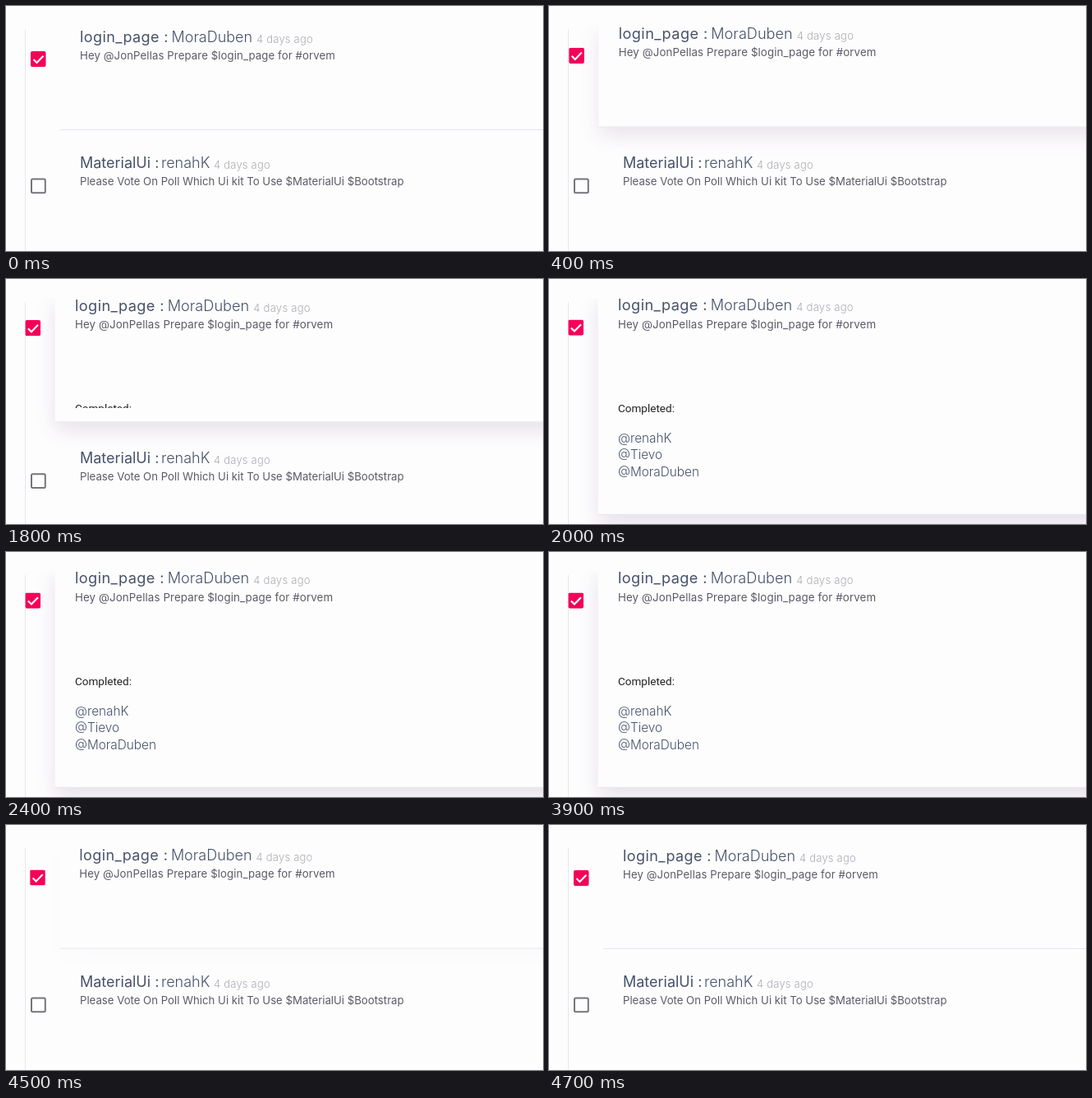
An HTML page that plays this animation: 654x298 px, repeating every 6300 ms.

```html
<!DOCTYPE html>
<html lang="en">
<head>
<meta charset="utf-8">
<title>Task list</title>
<style>
  html, body { margin: 0; width: 100%; height: 100%; overflow: hidden; background: #fefdfe; }
  #stage { position: relative; width: 654px; height: 298px; overflow: hidden; font-family: Inter, "Open Sans", sans-serif; }
  #stage div, #stage span, #stage svg { position: absolute; }
  #rail { left: 23px; top: 28px; width: 1px; height: 270px; background: #e6e5eb; }
  #view { left: 0; top: 23px; width: 654px; height: 275px; overflow: hidden; }
  #list { left: 0; top: -23px; }
  .item { left: 0; top: 0; width: 760px; }
  #first { z-index: 1; }
  #card { left: 66px; top: 24px; width: 680px; box-sizing: border-box; background: #fefdfe; border-bottom: 1px solid #e7e5ec; }
  #more { left: 66px; top: 134.5px; width: 500px; overflow: hidden; }
  span { line-height: 20px; white-space: pre; }
  .title { font-size: 18px; color: #46526a; }
  .name { font-size: 18px; font-weight: 300; color: #46526a; }
  .time { font-size: 13px; font-weight: 300; letter-spacing: .2px; color: #adadb5; }
  .body { font-size: 13.2px; color: #5a5a66; }
  .head { font: 13.4px/20px Roboto, sans-serif; color: #222; }
  .who { font-size: 15.2px; font-weight: 300; color: #46526a; }
</style>
</head>
<body>
<div id="stage">
  <div id="rail"></div>
  <div id="view"><div id="list">
    <div class="item" id="first">
      <div id="card"></div>
      <svg style="left:30px;top:55px" width="19" height="19">
        <rect width="18.500" height="19" rx="2" fill="#f50057"/>
        <path d="M3.500 10l4 4 8-8.300" fill="none" stroke="#fff" stroke-width="2.100"/>
      </svg>
      <span class="title" style="left:90px;top:28px;letter-spacing:.4px">login_page :</span>
      <span class="name" style="left:201.5px;top:28px">MoraDuben</span>
      <span class="time" style="left:305px;top:29.5px">4 days ago</span>
      <span class="body" style="left:90px;top:49.5px;letter-spacing:.1px">Hey @JonPellas Prepare $login_page for #orvem</span>
      <div id="more">
        <span class="head" style="left:24px;top:17px">Completed:</span>
        <span class="who" style="left:24px;top:53.5px">@renahK</span>
        <span class="who" style="left:24px;top:73.5px">@Tievo</span>
        <span class="who" style="left:24px;top:94px">@MoraDuben</span>
      </div>
    </div>
    <div class="item" id="second">
      <svg style="left:30px;top:209px" width="19" height="20">
        <rect x="1" y="1.500" width="16.800" height="16.800" rx="1.500" fill="none" stroke="#75757b" stroke-width="2"/>
      </svg>
      <span class="title" style="left:90px;top:181px">MaterialUi :</span>
      <span class="name" style="left:189px;top:181px">renahK</span>
      <span class="time" style="left:253px;top:182.5px">4 days ago</span>
      <span class="body" style="left:90px;top:203px">Please Vote On Poll Which Ui kit To Use $MaterialUi $Bootstrap</span>
    </div>
  </div></div>
</div>
<script>
const LOOP = 6300, STEP = 100, GROWTH = 139, CARD_TOP = 24, CARD_HEIGHT = 127;
const [first, second, card, more] = ['first', 'second', 'card', 'more'].map(id => document.getElementById(id));

// cubic-bezier(.4, 0, .2, 1)
function ease(x) {
  if (x <= 0 || x >= 1) return x <= 0 ? 0 : 1;
  let lo = 0, hi = 1;
  for (let i = 0; i < 20; i++) {
    const s = (lo + hi) / 2, r = 1 - s;
    if (1.2 * r * r * s + 0.6 * r * s * s + s ** 3 < x) lo = s; else hi = s;
  }
  return 3 * (1 - lo) * lo * lo + lo ** 3;
}

const ramp = (t, start, duration) => ease((t - start) / duration);

function draw(now) {
  const t = Math.floor(now % LOOP / STEP) * STEP;
  const lift = ramp(t, 100, 500) - ramp(t, 4200, 500);
  const extra = GROWTH * (ramp(t, 1740, 260) - ramp(t, 4030, 300));
  const height = CARD_HEIGHT + extra;

  card.style.height = height + 'px';
  card.style.boxShadow = `0 10px 24px rgba(75, 45, 100, ${0.14 * lift})`;
  more.style.height = extra + 'px';
  first.style.transformOrigin = `674px ${CARD_TOP + height / 2}px`;
  first.style.transform = lift ? `translateY(${-4.5 * lift}px) scale(${1 + 0.0103 * lift})` : 'none';
  second.style.transform = `translateY(${extra}px)`;
}

function frame() {
  draw(performance.now());
  requestAnimationFrame(frame);
}
frame();
</script>
</body>
</html>
```
